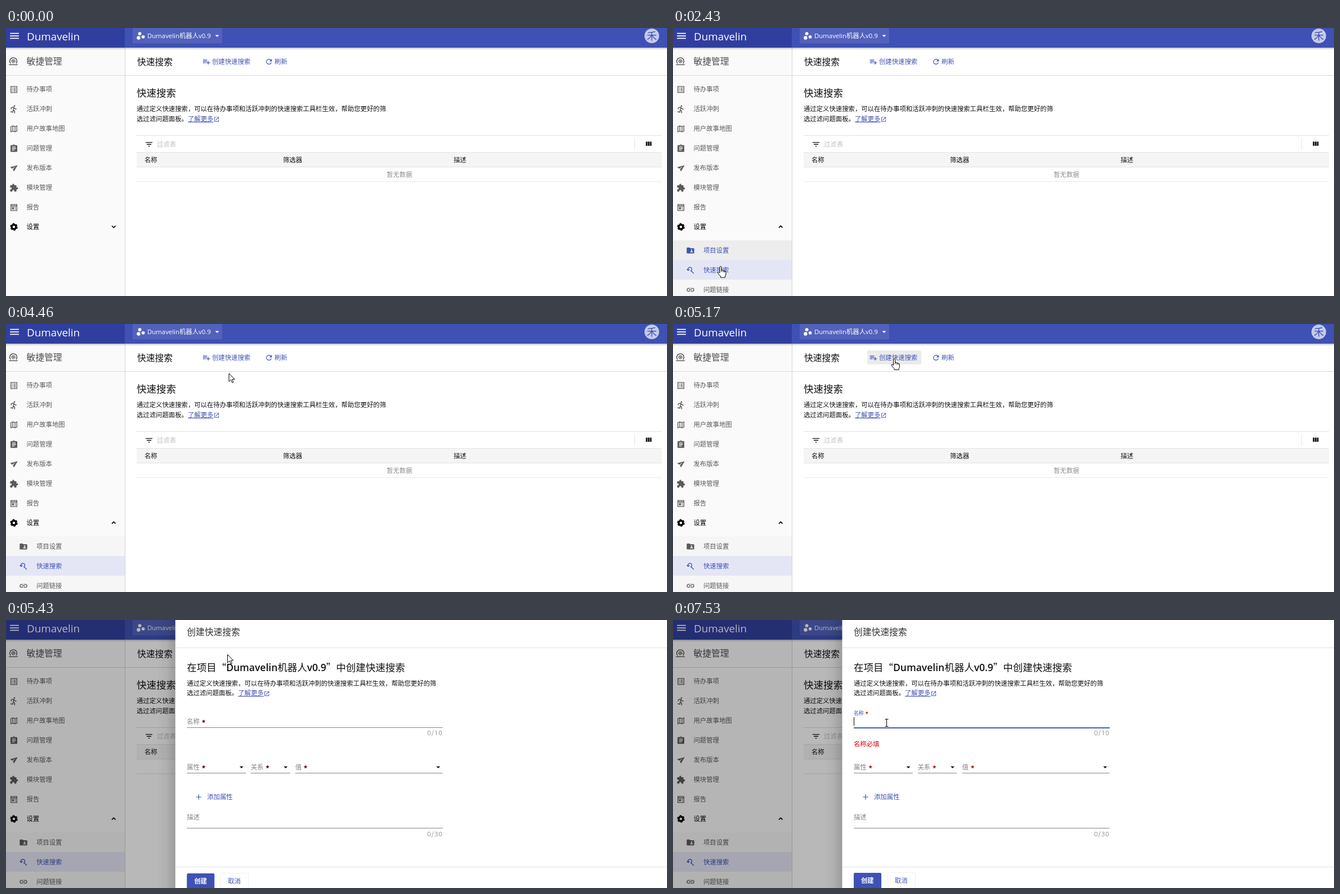
Write an HTML page that moves like this. It is 1174 px wide and 477 px high and loops after 8000 ms.

```html
<!DOCTYPE html>
<html lang="zh-CN">
<head>
<meta charset="utf-8">
<title>快速搜索</title>
<style>
html, body { margin: 0; width: 100%; height: 100%; overflow: hidden; background: #fff; }
svg { display: block; width: 1174px; height: 477px; }
text { font-family: "Noto Sans CJK SC", "Noto Sans CJK", sans-serif; white-space: pre; }
.latin { font-family: "Open Sans", "Noto Sans", sans-serif; }
.counter { letter-spacing: .08em; }
.heading .latin { font-weight: 600; }
</style>
</head>
<body>
<svg id="stage" viewBox="0 0 1174 477"></svg>
<script>
const LOOP = 8000;
const BLUE = '#3f51b5', GREY = '#5a5a5a', INK = '#111', RED = '#d50000';
const BODY = 11.375, TITLE = 15.75, HEAD = 17.5;
const BRAND = 'Dumavelin', PROJECT = BRAND + '机器人v0.9';

// Text is placed by its left edge and vertical centre.
const text = (x, cy, string, color = INK, size = BODY, attrs = '') =>
  `<text x="${x}" y="${cy + size * 0.38}" font-size="${size}" fill="${color}" ${attrs}>` +
  string.replace(/[A-Za-z0-9.]+/g, '<tspan class="latin">$&</tspan>') + '</text>';
const rect = (x, y, w, h, fill, attrs = '') =>
  `<rect x="${x}" y="${y}" width="${w}" height="${h}" fill="${fill}" ${attrs}/>`;
const path = (d, attrs = '') => `<path d="${d}" ${attrs}/>`;
const line = (d, width = 2) =>
  path(d, `fill="none" stroke="currentColor" stroke-width="${width}"`);
const ring = (r, width, attrs = '') =>
  `<circle cx="12" cy="12" r="${r}" fill="none" stroke="currentColor" stroke-width="${width}" ${attrs}/>`;

const icons = {
  menu: path('M3 6H21V8H3ZM3 11H21V13H3ZM3 16H21V18H3Z'),
  list: line('M4 4H20V20H4ZM7 8H9M11 8H17M7 12H9M11 12H17M7 16H9M11 16H17'),
  run: '<circle cx="13.5" cy="3.5" r="2"/>' +
    line('M5 12V8.5L10 6.5 12.5 7.5 15 11 19 12M12 7.5 10.5 14 14 17V23M10.5 14 9 20 3 18.8', 2.2),
  map: line('M4 6 9 4 15 6 20 4V18L15 20 9 18 4 20ZM9 4V18M15 6V20'),
  clipboard: path('M19 3h-4.2a3 3 0 0 0-5.6 0H5a2 2 0 0 0-2 2v14a2 2 0 0 0 2 2h14a2 2 0 0 0 2-2V5a2 2 0 0 0-2-2zm-7 0a1 1 0 1 1 0 2 1 1 0 0 1 0-2zM7 7h10v2H7zm0 4h10v2H7zm0 4h7v2H7z'),
  plane: path('M22 4 2 9.5 7.5 13 17 7 9.5 14.5 12 21Z'),
  puzzle: path('M20.5 11H19V7a2 2 0 0 0-2-2h-4V3.5a2.5 2.5 0 0 0-5 0V5H4a2 2 0 0 0-2 2v3.8h1.5a2.7 2.7 0 0 1 0 5.4H2V20a2 2 0 0 0 2 2h3.8v-1.5a2.7 2.7 0 0 1 5.4 0V22H17a2 2 0 0 0 2-2v-4h1.5a2.5 2.5 0 0 0 0-5z'),
  report: path('M3 3H21V21H3ZM5 9V19H19V9ZM5 5V6.5H19V5ZM7 11H12V17H7ZM14 11H17V13H14ZM14 15H17V17H14Z'),
  gear: ring(5.8, 5) + ring(8.8, 2.6, 'stroke-dasharray="5 4.215"'),
  folder: path('M20 6h-8l-2-2H4a2 2 0 0 0-2 2v12a2 2 0 0 0 2 2h16a2 2 0 0 0 2-2V8a2 2 0 0 0-2-2zm-5 3a2 2 0 1 1 0 4 2 2 0 0 1 0-4zm4 8h-8v-1c0-1.3 2.7-2 4-2s4 .7 4 2z'),
  search: line('M6 12A5.2 5.2 0 1 1 12 14.5M13.5 13.5 21 21M2.5 9.5 6 13 9.5 9.5'),
  link: line('M11 8H7A4 4 0 0 0 7 16H11M13 8H17A4 4 0 0 1 17 16H13M8 12H16'),
  agile: ring(4, 2.2, 'stroke-dasharray="2.2 .95"') + line('M5 18A9 9 0 1 1 19 18M1 21H23') + ring(1, 1.5),
  addList: path('M14 10H2v2h12zm0-4H2v2h12zm4 8v-4h-2v4h-4v2h4v4h2v-4h4v-2zM2 16h8v-2H2z'),
  refresh: path('M17.65 6.35A8 8 0 1 0 19.73 14h-2.08A6 6 0 1 1 16.2 7.8L13 11h7V4z'),
  open: path('M19 19H5V5h7V3H3v18h18v-9h-2zM14 3v2h3.6l-9.8 9.8 1.4 1.4L19 6.4V10h2V3z'),
  filter: path('M10 18h4v-2h-4zM3 6v2h18V6zm3 7h12v-2H6z'),
  plus: line('M12 4V20M4 12H20'),
  columns: path('M4 6H8.5V18H4ZM9.8 6H14.3V18H9.8ZM15.5 6H20V18H15.5Z'),
  group: '<circle cx="7" cy="17" r="4.5"/><circle cx="10" cy="6.5" r="4.2"/><circle cx="18.5" cy="14.5" r="4"/>',
};
const icon = (name, cx, cy, color = GREY, size = 16) =>
  `<g transform="translate(${cx - size / 2} ${cy - size / 2}) scale(${size / 24})" color="${color}" fill="${color}" fill-rule="evenodd">${icons[name]}</g>`;
const caretDown = (cx, cy, color = INK) =>
  path(`M${cx - 3.5} ${cy - 1.5}h7l-3.5 3.5z`, `fill="${color}"`);

const intro = (x, y) =>
  text(x, y, '通过定义快速搜索，可以在待办事项和活跃冲刺的快速搜索工具栏生效，帮助您更好的筛') +
  text(x, y + 17.5, '选过滤问题面板。') +
  text(x + 91, y + 17.5, '了解更多', BLUE, BODY, 'text-decoration="underline"') +
  icon('open', x + 142, y + 18.5, BLUE, 11);

const menu = [['list', '待办事项'], ['run', '活跃冲刺'], ['map', '用户故事地图'], ['clipboard', '问题管理'],
  ['plane', '发布版本'], ['puzzle', '模块管理'], ['report', '报告']];

const topBar = () =>
  rect(0, 35, 1174, 4, 'url(#barShadow)') + rect(211, 0, 963, 35, BLUE) + rect(0, 0, 211, 35, '#303f9f') +
  icon('menu', 15, 14, '#fff', 21) + text(37, 15, BRAND, '#fff', 18.8) +
  rect(225, 0, 159, 27.5, '#5262bc', 'rx="2"') + icon('group', 239, 14, '#fff', 17) +
  text(251, 14, PROJECT, '#fff') + caretDown(375, 14, '#fff') +
  '<circle cx="1147" cy="14" r="13" fill="#c5cbe9"/>' + text(1138, 14, '禾', BLUE, 18, 'font-weight="500"');

const sidebar = () =>
  rect(0, 35, 211, 442, '#fafafa') + rect(0, 336, 211, 35, '#f3f3f3', 'id="settingsHover"') +
  icon('agile', 13, 59, '#444', 17) + text(36.5, 59, '敏捷管理', '#4d4d4d', TITLE) +
  menu.map(([name, label], i) => icon(name, 14, 109.5 + 35 * i) + text(36.5, 109 + 35 * i, label, GREY)).join('') +
  icon('gear', 14, 354, '#000') + text(36.5, 354, '设置', '#000') +
  path('M188 352l3.3 3.3 3.3-3.3', 'id="chevron" fill="none" stroke="#000" stroke-width="1.6"') +
  `<g clip-path="url(#submenuClip)">` +
  rect(0, 378, 211, 99, '#f6f6f6') + rect(0, 413, 211, 35, '#e4e6f5') +
  icon('folder', 31, 396) + text(54, 396, '项目设置', GREY) +
  '<g id="projectHover">' + rect(0, 378, 211, 35, '#ededed') +
  icon('folder', 31, 396, BLUE) + text(54, 396, '项目设置', BLUE) + '</g>' +
  icon('search', 31, 431, BLUE) + text(54, 431, '快速搜索', BLUE) +
  icon('link', 31, 466) + text(54, 466, '问题链接', GREY) + '</g>' +
  rect(211, 35, 1, 442, '#d3d3d3') + rect(0, 84, 1174, 1, '#d8d8d8');

const page = () =>
  text(233, 60, '快速搜索', INK, TITLE) +
  rect(345, 47, 96, 25, '#ebebeb', 'id="createHover" rx="2"') +
  icon('addList', 356, 60, BLUE, 15) + text(366, 60, '创建快速搜索', BLUE) +
  icon('refresh', 467, 60, BLUE, 15) + text(477, 60, '刷新', BLUE) +
  text(232, 115, '快速搜索', INK, HEAD) + intro(232, 144) +
  rect(232, 191, 933, 1, '#dfdfdf') + icon('filter', 254, 207, INK, 16) + text(268, 207, '过滤表', '#bfbfbf') +
  rect(1116, 195, 1, 22, '#e4e4e4') + icon('columns', 1141.5, 206, INK, 15) +
  rect(232, 221, 933, 27, '#e3e3e3') + rect(232, 222, 933, 25, '#f5f5f5') +
  text(246, 235, '名称') + text(492, 235, '筛选器') + text(795, 235, '描述') +
  text(676, 261, '暂无数据', '#8c8c8c') + rect(232, 273, 933, 1, '#e6e6e6');

const star = (x, cy) => `<text class="star" x="${x}" y="${cy + 8}" font-size="14" font-weight="700">*</text>`;
const required = (x, cy, label) =>
  text(x, cy, label, '#808080') + star(x + label.length * BODY + 3.5, cy);
const counter = (cy, max) =>
  text(775.5, cy, `0/${max}`, '#8c8c8c', BODY, 'class="counter" text-anchor="end"');
const underline = (x1, x2, y) => rect(x1, y, x2 - x1, 1, '#858585');
const select = (x1, x2, label) =>
  required(x1, 262, label) + caretDown(x2 - 8, 262) + underline(x1, x2, 272);

const drawer = () =>
  rect(268, 0, 33, 477, 'url(#drawerShadow)') + rect(300.5, 0, 873.5, 477, '#fff') +
  text(321, 21, '创建快速搜索', '#333', TITLE) + rect(300.5, 49, 873.5, 1, '#e2e2e2') +
  text(321, 84, `在项目“${PROJECT}”中创建快速搜索`, INK, HEAD, 'class="heading"') + intro(321, 112.5) +
  `<g id="nameLabel">${required(321, 181, '名称')}</g>` + underline(321, 775.5, 191) +
  rect(321, 191, 454.5, 2, '#3f5fc4', 'id="focusLine"') + rect(321, 173, 1, 15, '#000', 'id="textCaret"') +
  counter(201, 10) + text(321, 221, '名称必填', RED, BODY, 'id="error"') +
  select(321, 426, '属性') + select(434.5, 504.5, '关系') + select(513.5, 775.5, '值') +
  icon('plus', 342, 315, BLUE, 14) + text(357, 315, '添加属性', BLUE) +
  text(321, 350.5, '描述', '#808080') + underline(321, 775.5, 370) + counter(381, 30) +
  rect(300.5, 439, 873.5, 1, '#e2e2e2') + '<g id="buttons">' +
  rect(321, 451, 49, 30, BLUE, 'rx="2"') + text(334, 465, '创建', '#fff', BODY, 'font-weight="700"') +
  rect(380.5, 450.5, 50, 30, '#fff', 'rx="2" stroke="#efefef"') + text(394, 465, '取消', BLUE) + '</g>';

const outline = 'fill="#fff" stroke="#000" stroke-linejoin="round"';
const cursors =
  path('M0 0V14.5L3.4 11.3 5.8 16.6 8 15.6 5.7 10.5H10.2Z', `id="arrow" ${outline}`) +
  path('M-2 1.8Q-2 .2-.5 .2T1 1.8V7Q3.5 6 4 8 6 7 6.5 9 9 8.5 9 11V14Q9 16 7.5 18V20H-.5V18Q-3 15.5-5 12.5-6 10.5-4.5 10.3-3.3 10.2-2 12ZM1 7V10M4 8V10.5M6.5 9V11', `id="hand" ${outline}`) +
  path('M-3-6.5H3M0-6.5V6.5M-3 6.5H3', 'id="beam" fill="none" stroke="#000"');

document.getElementById('stage').innerHTML =
  `<defs>
    <linearGradient id="barShadow" x2="0" y2="1"><stop stop-opacity=".22"/><stop offset="1" stop-opacity="0"/></linearGradient>
    <linearGradient id="drawerShadow"><stop stop-opacity="0"/><stop offset=".5" stop-opacity=".04"/><stop offset="1" stop-opacity=".16"/></linearGradient>
    <clipPath id="submenuClip"><rect id="submenuArea" y="371" width="211" height="0"/></clipPath>
  </defs>` +
  rect(0, 0, 1174, 477, '#fff') + sidebar() + page() + topBar() +
  rect(0, 0, 1174, 477, '#000', 'id="mask"') + `<g id="drawer">${drawer()}</g><g id="cursor">${cursors}</g>`;

const $ = id => document.getElementById(id);
const set = (id, name, value) => $(id).setAttribute(name, value);
const show = (id, visible) => set(id, 'display', visible ? 'inline' : 'none');
const progress = (t, start, end) => Math.min(1, Math.max(0, (t - start) / (end - start)));
const smooth = p => p * p * (3 - 2 * p);
const easeOut = p => 1 - (1 - p) ** 5;

// Pointer stops: time, x, y
const route = [[690, 112, 484], [1180, 95, 362], [1380, 92, 359], [1750, 92, 359], [2300, 85, 424],
  [2640, 85, 424], [2690, 85, 428], [3700, 85, 428], [4200, 436, 150], [4460, 396, 88], [4510, 396, 88],
  [4800, 393.5, 61.5], [6000, 393.5, 61.5], [6440, 379.5, 183], [LOOP, 379.5, 183]];
function pointerAt(t) {
  const next = route.findIndex(stop => stop[0] > t);
  if (next < 1) return route[0].slice(1);
  const [t0, x0, y0] = route[next - 1], [t1, x1, y1] = route[next];
  const p = smooth(progress(t, t0, t1));
  return [x0 + (x1 - x0) * p, y0 + (y1 - y0) * p];
}

function draw(t) {
  const [x, y] = pointerAt(t);
  const opened = t >= 5212;
  const onMenu = x < 211 && y >= 336 && (y < 371 || t > 1510);
  const onCreate = t > 4510 && y < 72;
  const kind = t > 6000 && y > 171 ? 'beam' : onMenu || (onCreate && !opened) ? 'hand' : 'arrow';
  for (const id of ['arrow', 'hand', 'beam']) show(id, id === kind);
  set('cursor', 'transform', `translate(${x} ${y})`);

  show('settingsHover', onMenu && y < 371);
  set('projectHover', 'opacity', progress(t, 1980, 2120) * (1 - progress(t, 2430, 2560)));
  show('createHover', onCreate && t < 5400);
  const unfold = smooth(progress(t, 1510, 1750));
  set('submenuArea', 'height', 106 * unfold);
  set('chevron', 'transform', `rotate(${180 * unfold} 191.3 353.7)`);

  const slide = easeOut(progress(t, 5212, 5512));
  show('drawer', opened);
  set('drawer', 'opacity', slide);
  set('drawer', 'transform', `translate(1174 0) scale(${0.8 + 0.2 * slide} 1) translate(-1174 0)`);
  set('mask', 'opacity', 0.28 * progress(t, 5212, 5412));

  const focus = smooth(progress(t, 6600, 6760));
  set('nameLabel', 'transform', `translate(321 ${181 - 15 * focus}) scale(${1 - 0.22 * focus}) translate(-321 -181)`);
  $('nameLabel').firstChild.setAttribute('fill', focus > 0 ? BLUE : '#808080');
  set('focusLine', 'transform', `translate(548 0) scale(${focus} 1) translate(-548 0)`);
  show('textCaret', (t >= 6600 && t < 7010) || t >= 7530);
  set('error', 'opacity', progress(t, 6990, 7130));
  set('buttons', 'transform', `translate(0 ${t >= 7010 ? -1 : 0})`);
  for (const node of document.querySelectorAll('.star')) node.setAttribute('fill', t < 5800 ? '#4a0a12' : RED);
}

function tick() {
  draw(performance.now() % LOOP);
  requestAnimationFrame(tick);
}
tick();
</script>
</body>
</html>
```
